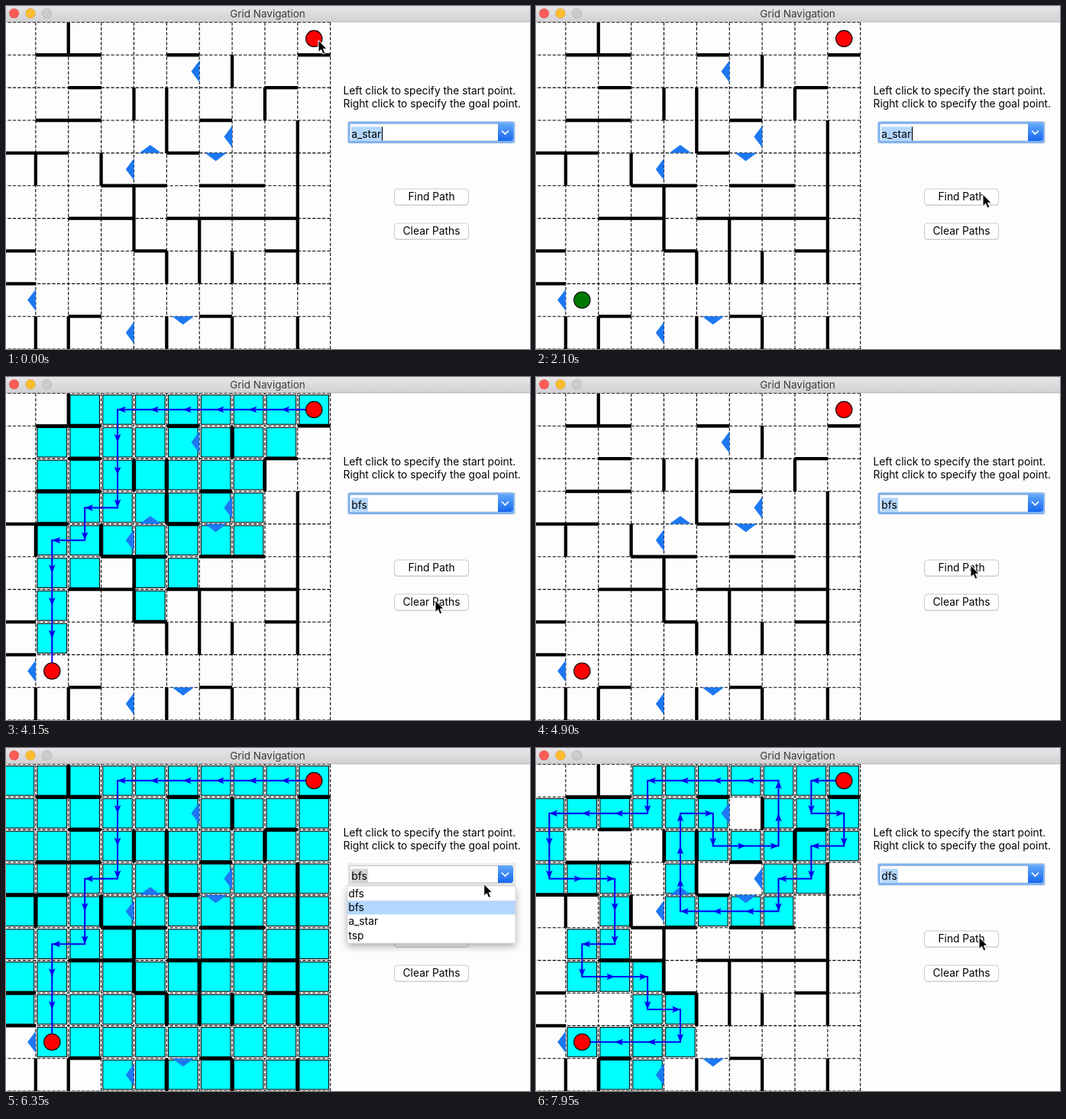
Write an HTML page that moves like this. It is 686 by 450 pixels and loops after 8000 ms.

```html
<!DOCTYPE html>
<html lang="en">
<head>
<meta charset="utf-8">
<title>Grid Navigation</title>
<style>
html, body { margin: 0; width: 100%; height: 100%; overflow: hidden; background: #fefdfe; }
svg { display: block; }
text { font: 13.8px Inter, "Open Sans", sans-serif; fill: #000; }
</style>
</head>
<body>
<svg id="stage" width="686" height="450" viewBox="0 0 686 450">
  <defs>
    <linearGradient id="bar" x2="0" y2="1"><stop stop-color="#e7e5e7"/><stop offset="1" stop-color="#d2d0d2"/></linearGradient>
    <linearGradient id="blue" x2="0" y2="1"><stop stop-color="#62a8f8"/><stop offset="1" stop-color="#1768ee"/></linearGradient>
    <filter id="shadow" x="-15%" y="-20%" width="130%" height="160%"><feDropShadow dx="0" dy="4" stdDeviation="5" flood-opacity=".32"/></filter>
  </defs>
</svg>
<script>
const LOOP = 8000, SIZE = 10, CELL = 40;
const stage = document.getElementById('stage');

function add(parent, tag, attrs = {}, text) {
  const node = document.createElementNS('http://www.w3.org/2000/svg', tag);
  for (const key in attrs) node.setAttribute(key, attrs[key]);
  if (text) node.textContent = text;
  parent.append(node);
  return node;
}
const rect = (parent, x, y, width, height, attrs) => add(parent, 'rect', { x, y, width, height, ...attrs });
const label = (parent, x, y, text, attrs) => add(parent, 'text', { x, y, ...attrs }, text);
const show = (node, on) => node.setAttribute('visibility', on ? 'visible' : 'hidden');

// Borders of each cell: "." open, "-" and "|" walls, arrows are one-way.
const floors = [
  '.--..-...-',
  '..-.....-.',
  '.--...-...',
  '--..^-v...',
  '...--.--..',
  '..--.----.',
  '-...-...-.',
  '-.........',
  '..-..v-...'
];
const sides = [
  '.|.......',
  '.....<|..',
  '...||..|.',
  '....|.<.|',
  '|.|<....|',
  '...|....|',
  '...|.|..|',
  '....|||.|',
  '<........',
  '||.<|.|.|'
];

const start = [9, 0], goal = [1, 8];
const steps = {
  L: { dx: -1, dy: 0, sign: '<', border: (c, r) => sides[r][c - 1] },
  R: { dx: 1, dy: 0, sign: '>', border: (c, r) => sides[r][c] },
  U: { dx: 0, dy: -1, sign: '^', border: (c, r) => floors[r - 1]?.[c] },
  D: { dx: 0, dy: 1, sign: 'v', border: (c, r) => floors[r]?.[c] }
};
const distance = (c, r) => Math.abs(c - goal[0]) + Math.abs(r - goal[1]);
const shortest = distance(...start);

// Breadth-first spread from the start; keep(c, r, cost) limits the cells.
function flood(keep) {
  const found = [[...start, 0]], seen = new Set([String(start)]);
  for (const [c, r, cost] of found) {
    if (!distance(c, r)) continue;
    for (const { dx, dy, sign, border } of Object.values(steps)) {
      const next = [c + dx, r + dy], key = String(next);
      if (!['.', sign].includes(border(c, r)) || seen.has(key) || !keep(...next, cost + 1)) continue;
      seen.add(key);
      found.push([...next, cost + 1]);
    }
  }
  return found;
}

// Follow a route such as "L6D3" cell by cell.
function walk(route, from = start) {
  const cells = [from];
  for (const [, dir, count] of route.matchAll(/([LRUD])(\d*)/g))
    for (let i = 0; i < (+count || 1); i++) {
      const [c, r] = cells.at(-1);
      cells.push([c + steps[dir].dx, r + steps[dir].dy]);
    }
  return cells;
}

const depthPath = walk('LDRDLDLDL3U3RDR2U2L4DL3D2R2D2LDR2DRDL3');
const searches = [
  {
    from: 2350, to: 4200, path: walk('L6D3LDLD4'),
    cells: flood((c, r, cost) => cost < shortest && cost + distance(c, r) <= shortest)
  },
  {
    from: 5250, to: 6780, path: walk('L6D3LD2LD3'),
    cells: flood((c, r, cost) => cost <= shortest + 1)
  },
  { from: 7500, to: LOOP, path: depthPath, cells: [...depthPath, ...walk('DL', [3, 8])] }
];

// The grid is drawn in cell units of 40 and scaled to the window.
const board = add(stage, 'g', { transform: 'translate(-4 21.4) scale(1.0717)' });
const mid = k => (k + .5) * CELL;

for (const search of searches) {
  search.area = add(board, 'g');
  for (const [c, r] of search.cells)
    rect(search.area, c * CELL + 2, r * CELL + 2, 36, 36, { fill: '#0ff', stroke: '#000' });
}

let dashes = '';
for (let k = 0; k <= SIZE; k++)
  dashes += `M0 ${k * CELL}h400M${k * CELL} 0v400`;
add(board, 'path', { d: dashes, stroke: '#000', 'stroke-dasharray': '4 2' });

const eachBorder = (rows, draw) => rows.forEach((row, r) => [...row].forEach((sign, c) => draw(sign, c, r)));
let walls = '';
const markers = add(board, 'g');
function marker(x, y, turn) {
  add(markers, 'path', { d: 'M0-13.3V13.3L-10 0Z', fill: '#1c78f2', transform: `translate(${x} ${y}) rotate(${turn})` });
}
eachBorder(floors, (sign, c, r) => {
  const y = (r + 1) * CELL;
  if (sign === '-') walls += `M${c * CELL} ${y}h${CELL}`;
  else if (sign !== '.') marker(mid(c), y, sign === '^' ? 90 : -90);
});
eachBorder(sides, (sign, c, r) => {
  const x = (c + 1) * CELL;
  if (sign === '|') walls += `M${x} ${r * CELL}v${CELL}`;
  else if (sign === '<') marker(x, mid(r), 0);
});
add(board, 'path', { d: walls, stroke: '#000', 'stroke-width': 4 });

for (const search of searches) {
  search.line = add(board, 'g');
  const points = search.path.map(([c, r]) => [mid(c), mid(r)]);
  add(search.line, 'polyline', { points: points.join(' '), fill: 'none', stroke: '#0000f0', 'stroke-width': 1.9 });
  points.slice(1).forEach(([x, y], i) => {
    const angle = Math.atan2(y - points[i][1], x - points[i][0]) * 180 / Math.PI;
    add(search.line, 'path', {
      d: 'M0 0L-10-4L-8 0L-10 4Z', fill: '#0000f0',
      transform: `translate(${x} ${y}) rotate(${angle})`
    });
  });
}

const dot = ([c, r]) => add(board, 'circle', { cx: mid(c), cy: mid(r), r: 10, fill: '#f00', stroke: '#000' });
dot(start);
const goalDot = dot(goal);

// Window chrome
rect(stage, 0, 0, 686, 21, { fill: 'url(#bar)' });
rect(stage, 0, 20.3, 686, 1, { fill: '#b9b7b9' });
['#fc5b57', '#fdbc2f', '#cdcbcd'].forEach((fill, i) =>
  add(stage, 'circle', { cx: 10.6 + 21.4 * i, cy: 9.6, r: 6.4, fill, stroke: '#000', 'stroke-opacity': .1 }));
label(stage, 342.5, 15, 'Grid Navigation', { 'text-anchor': 'middle', style: 'font-size:13.5px;fill:#3c3a3c' });

label(stage, 441.5, 116, 'Left click to specify the start point.');
label(stage, 441.5, 133, 'Right click to specify the goal point.');

function button(y, text) {
  rect(stage, 508.5, y + 1, 97, 21, { rx: 4, fill: '#d5d3d5' });
  rect(stage, 508.5, y, 97, 21, { rx: 4, fill: '#fff', stroke: '#cbc9cb' });
  label(stage, 557, y + 15.3, text, { 'text-anchor': 'middle' });
}
button(240, 'Find Path');
button(285, 'Clear Paths');

// Combo box
rect(stage, 447, 151, 220.5, 30, { fill: '#ececec' });
rect(stage, 450, 154.5, 213, 22.5, { fill: '#fff', stroke: '#c4c2c4' });
const ring = rect(stage, 449, 153, 215.5, 25.5, { rx: 2, fill: 'none', stroke: '#80b3f0', 'stroke-width': 3 });
const selection = rect(stage, 452, 158.5, 40, 18);
const value = label(stage, 452.3, 172.6, 'a_star');
const caret = rect(stage, 492, 158.5, 1.1, 18, { fill: '#000' });
add(stage, 'path', { d: 'M644 154H660Q664 154 664 158V173Q664 177 660 177H644Z', fill: 'url(#blue)' });
add(stage, 'path', { d: 'M649 163.5L653.5 168L658 163.5', fill: 'none', stroke: '#fff', 'stroke-width': 1.7 });

const menu = add(stage, 'g');
const options = ['dfs', 'bfs', 'a_star', 'tsp'];
const menuTop = 182, itemHeight = 18.2;
rect(menu, 447, 181, 220, 75, { fill: '#fff', stroke: '#c8c6c8', 'stroke-width': .7, filter: 'url(#shadow)' });
const highlight = rect(menu, 447, 0, 220, itemHeight, { fill: '#b3d7fe' });
options.forEach((name, i) => label(menu, 448.3, menuTop + 14 + itemHeight * i, name));

const cursor = add(stage, 'path', {
  d: 'M0 0V15.5L3.6 12.3L6 18L8.8 16.8L6.4 11.2H11Z', fill: '#000', stroke: '#fff', 'stroke-width': 1
});

// Pointer stops: arrival time and place
const stops = [
  [0, 409, 45], [950, 62, 386], [2000, 585, 247], [3300, 646, 157], [3750, 560, 207], [4150, 562, 293],
  [4800, 569, 247], [6150, 656, 165], [6530, 600, 190], [6750, 572, 293], [7300, 580, 248]
];
const TRAVEL = 700;

function pointerAt(t) {
  const i = stops.findLastIndex(stop => stop[0] <= t);
  const [t0, x0, y0] = stops[i], [t1, x1, y1] = stops[i + 1] || [LOOP, x0, y0];
  const span = Math.min(TRAVEL, t1 - t0);
  const u = Math.max(0, 1 - (t1 - t) / span), e = u * u * (3 - 2 * u);
  return [x0 + (x1 - x0) * e, y0 + (y1 - y0) * e];
}

// Each choice opens the menu and closes it with a new value.
const choices = [
  { opened: 3400, closed: 3800, name: 'bfs' },
  { opened: 6250, closed: 6580, name: 'dfs' }
];

function draw(t) {
  for (const s of searches) {
    const on = t >= s.from && t < s.to;
    show(s.area, on);
    show(s.line, on);
  }
  show(goalDot, t >= 1050);
  goalDot.setAttribute('fill', t < searches[0].from ? '#007a00' : '#f00');

  const [x, y] = pointerAt(t);
  cursor.setAttribute('transform', `translate(${x} ${y})`);

  const name = choices.findLast(choice => t >= choice.closed)?.name || 'a_star';
  const open = choices.some(choice => t >= choice.opened && t < choice.closed);
  value.textContent = name;
  selection.setAttribute('width', name === 'a_star' ? 40 : 22);
  selection.setAttribute('fill', open ? '#d3d1d3' : '#b3d7fe');
  show(ring, !open);
  show(menu, open);
  show(caret, name === 'a_star' && !open && (t + 100) % 900 < 600);
  const item = y < menuTop ? options.indexOf(name) : Math.min(3, Math.floor((y - menuTop) / itemHeight));
  highlight.setAttribute('y', menuTop + itemHeight * item);
}

const begin = performance.now();
function tick() {
  draw(Math.floor((performance.now() - begin) % LOOP / 50) * 50);
  requestAnimationFrame(tick);
}
tick();
</script>
</body>
</html>
```
